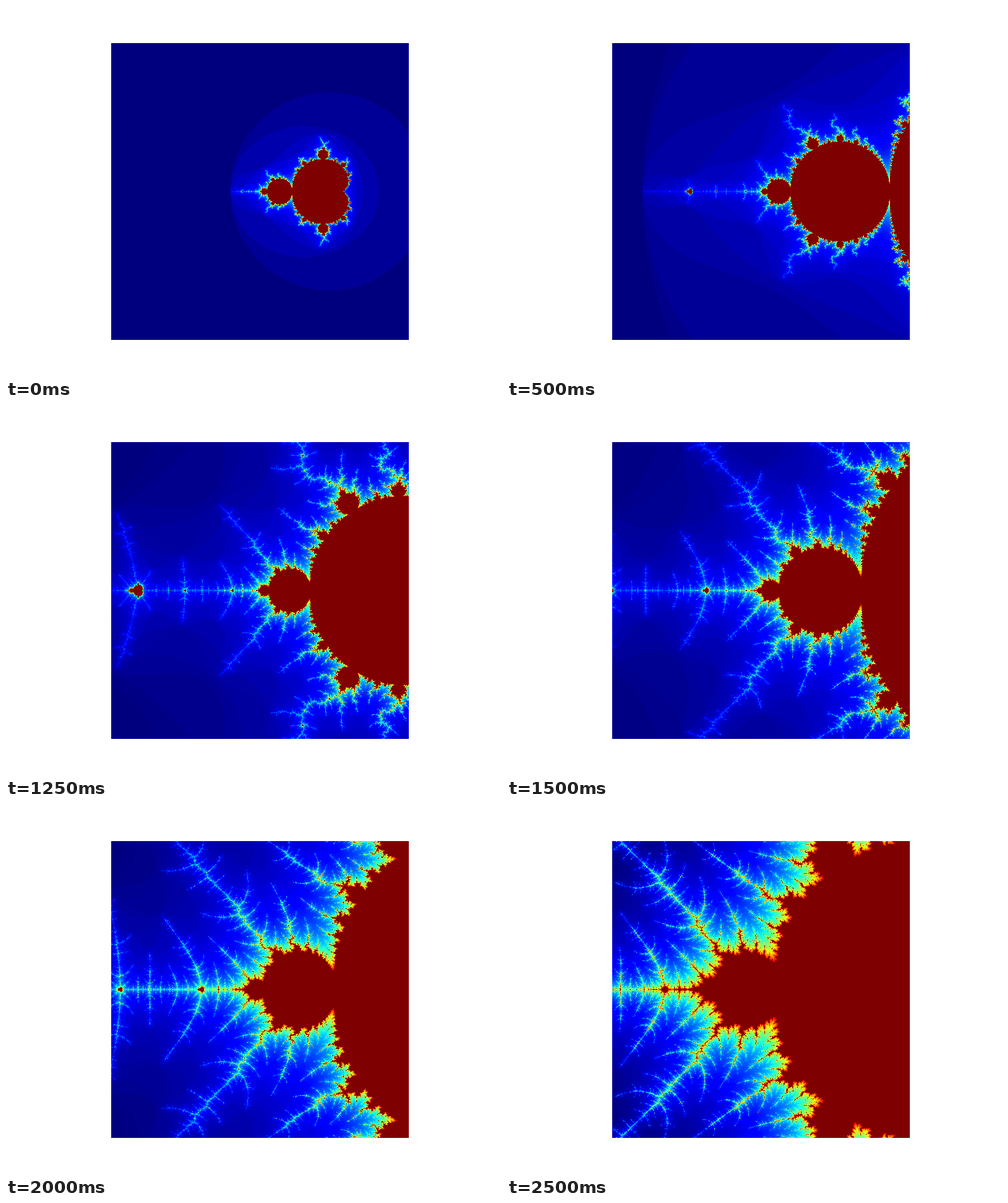
Animation, 800 px wide and 600 px high, one loop 3.75 s. Source, as a matplotlib script:

```python
import numpy as np
import matplotlib.pyplot as plt
from matplotlib.animation import FuncAnimation

WIDTH, HEIGHT = 800, 600
COLS, ROWS = 481, 480
CENTER = -1.4
START_SPAN = 6.0
ZOOMS = 11
FRAMES = 15  # the deepest view is held to the end of the loop


def escape_counts(c, limit):
    """Iterations until |z| > 2 for each point; points that stay get limit."""
    counts = np.full(c.size, limit)
    index = np.arange(c.size)
    c = c.ravel()
    z = c.copy()
    for i in range(limit):
        gone = z.real * z.real + z.imag * z.imag > 4
        if gone.any():
            counts[index[gone]] = i
            stay = ~gone
            index, c, z = index[stay], c[stay], z[stay]
        z *= z
        z += c
    return counts


def view(zoom):
    """Escape counts of one zoom step; the lower half mirrors the upper."""
    span = START_SPAN / 2**zoom
    x = CENTER + np.linspace(-span / 2, span / 2, COLS)
    y = (np.arange(ROWS // 2) + 0.5) * span / ROWS
    c = x[None, :] + 1j * y[:, None]
    half = escape_counts(c, 50 + 20 * zoom).reshape(c.shape)
    return np.vstack([half[::-1], half])


views = [view(zoom) for zoom in range(ZOOMS)]

fig = plt.figure(figsize=(WIDTH / 100, HEIGHT / 100), dpi=100, facecolor="white")
ax = fig.add_axes([170 / WIDTH, 60 / HEIGHT, COLS / WIDTH, ROWS / HEIGHT])
ax.axis("off")
image = ax.imshow(views[0], cmap="jet", interpolation="nearest", aspect="auto")


def update(frame):
    counts = views[min(frame, ZOOMS - 1)]
    image.set_data(counts)
    image.set_clim(counts.min(), counts.max())
    return [image]


anim = FuncAnimation(fig, update, frames=FRAMES, interval=250,
                     repeat=True, repeat_delay=0)
plt.show()
```
